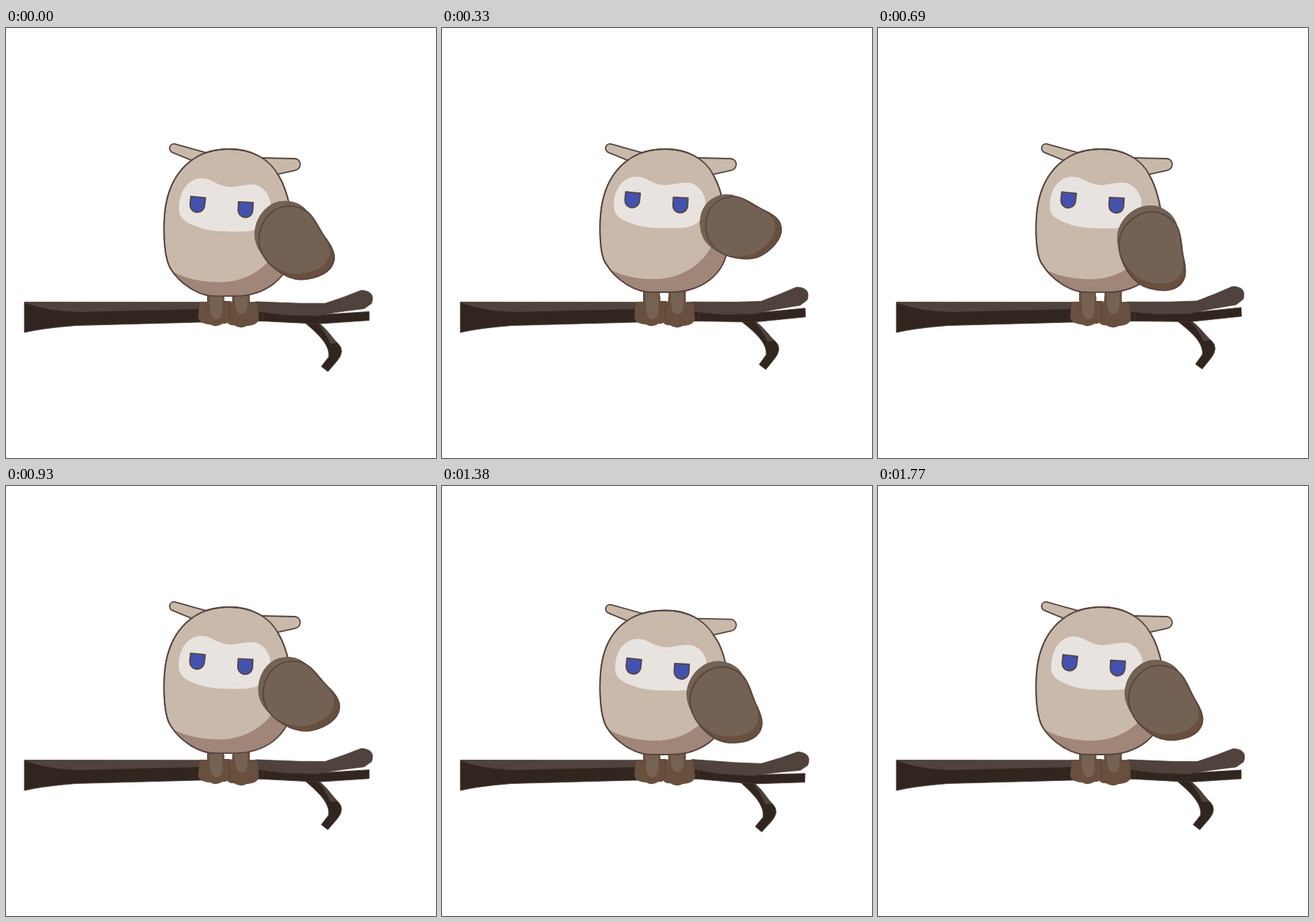
Animation of 586x586 px, one loop 1.8 s. Source, as an HTML page:

```html
<!DOCTYPE html>
<html lang="en">
<head>
<meta charset="utf-8">
<title>Owl on a branch</title>
<style>
  html, body { margin: 0; width: 100%; height: 100%; overflow: hidden; background: #fff; }
  svg { display: block; width: 100vw; height: 100vh; }
  .line { stroke: #574540; stroke-width: 1.8; stroke-linejoin: round; }
  .bark { stroke: #4a3a34; stroke-width: 0.8; stroke-linejoin: round; }
  .ear { stroke-linejoin: round; }
</style>
</head>
<body>
<svg viewBox="0 0 586 586">
  <defs>
    <path id="egg"/>
    <path id="leftEar" class="ear" d="M229 164L272 176L256 175Z"/>
    <path id="rightEar" class="ear" d="M393 186L349 185L366 192Z"/>
    <path id="feather" d="M343.500 290C344 262 365 243 385 243C420 244 421 270 437 291C447 306 450 318 440 330C428 343 405 344 400 344C378 343 345 320 343.500 290Z"/>
    <path id="leg" d="M-11 352H12V372H20V398Q17 404 10 403Q2 409 -7 404Q-22 403 -23 394L-21 373H-11Z"/>
    <path id="shin" d="M-8 352H10V387Q9 397 1 397Q-6 396 -7 382Z"/>
    <path id="eye" d="M-10-10H10V1C9 14-9 14-10 1Z"/>
    <clipPath id="eggClip"><use href="#egg"/></clipPath>
    <clipPath id="featherClip"><use href="#feather"/></clipPath>
  </defs>

  <g id="bough">
    <path class="bark" fill="#31261f" d="M408 402L425 401C438 410 445 423 453 430Q463 440 451 454L439 468L430 461L440 448C442 432 426 417 408 402Z"/>
    <path fill="#4f423d" d="M424 402C438 410 445 423 452 429L442 430Q436 414 424 402Z"/>
    <path class="bark" fill="#31261f" d="M340 382L435 390L495 386V398L425 403L340 399Z"/>
    <path class="bark" fill="#50423c" d="M340 373L400 375H435L461 366L484 357Q504 358 498 375L488 382Q440 388 425 392L380 391L340 386Z"/>
  </g>
  <path class="bark" fill="#31261f" d="M25 373.500L350 374V399L262 401L95 405.500Q50 409 25 415Z"/>
  <path fill="#50423c" d="M25 374L350 373.500V387L262 383L100 387Q55 386 25 374Z"/>

  <g fill="#69503e">
    <use href="#leg" x="285"/>
    <use href="#leg" transform="translate(321 2) scale(-1.030 1)"/>
    <path fill="none" stroke="#59402f" d="M297 366V373H309V366M304.500 374V399"/>
  </g>
  <g fill="#766253">
    <use href="#shin" x="285"/>
    <use href="#shin" x="319" y="-7"/>
  </g>

  <g id="ears" stroke="#574540">
    <use href="#leftEar" stroke-width="13.800"/>
    <use href="#rightEar" stroke-width="17.800"/>
  </g>
  <use href="#egg" class="line" fill="#c9b9aa"/>
  <g id="earFill" fill="#c9b9aa" stroke="#c9b9aa">
    <use href="#leftEar" stroke-width="10.200"/>
    <use href="#rightEar" stroke-width="14.200"/>
  </g>
  <g clip-path="url(#eggClip)">
    <path id="shade" fill="#a08679" d="M210 318Q235 346 290 347C337 347 367 318 377 284Q386 256 384 226H405V380H210Z"/>
  </g>
  <use href="#egg" id="rim" class="line" fill="none" clip-path="inset(0)"/>
  <path id="face" fill="#e8e3df" d="M236 245C237 215 255 205 266 205C282 205 288 217 308 217C330 214 338 211 347 217C358 224 361 236 361 243C360 270 345 278 320 278C300 278 285 278 268 274C248 267 235 262 236 245Z"/>
  <g id="eyes" class="line" fill="#4352ae">
    <use href="#eye" transform="translate(261 241) rotate(6)"/>
    <use href="#eye" transform="translate(326.500 248) rotate(3)"/>
  </g>

  <g id="wing">
    <use href="#feather" fill="#69503e"/>
    <use href="#feather" x="-6" y="-7.500" fill="#736253" clip-path="url(#featherClip)" id="sheen"/>
    <use href="#feather" class="line" fill="none"/>
  </g>
</svg>
<script>
const LOOP = 1800, STEP = 30;
const wingAngles = [[285, -32], [680, 22], [1155, -39], [1480, 22], [1560, 22]];
const boughDrops = [[600, -5.5], [1230, 6]];

const $ = id => document.getElementById(id);
const move = (id, transform) => $(id).setAttribute('transform', transform);

// Cosine easing through looping [time, value] keys.
function eased(keys, t) {
  const first = keys[0], last = keys[keys.length - 1];
  const ring = [[last[0] - LOOP, last[1]], ...keys, [first[0] + LOOP, first[1]]];
  const i = ring.findIndex(key => key[0] > t);
  const [t0, a] = ring[i - 1], [t1, b] = ring[i];
  return a + (b - a) * (1 - Math.cos(Math.PI * (t - t0) / (t1 - t0))) / 2;
}

function eggPath(top, bottom, side) {
  return `M304 ${top}C335 ${top} 358 ${top + 13} ${371 + side / 2} ${top + 35}
    C${386 + side} 224 ${392 + side} 262 ${391 + side / 2} 295
    C${388 + side / 2} ${bottom - 21} 350 ${bottom} 310 ${bottom}H285
    C262 ${bottom} 236 ${bottom - 18} 224 ${bottom - 38}
    C214 310 213 262 219 235C227 200 252 ${top} 304 ${top}Z`;
}

function draw(t) {
  // Rising lifts the lower body; sinking presses down the head.
  const bob = -1.7 + 6.2 * Math.cos(2 * Math.PI * (t - 1400) / LOOP);
  const lift = Math.min(bob, 0), press = Math.max(bob, 0);

  $('egg').setAttribute('d', eggPath(165 + press, 366 + lift * 0.88, lift * 0.4));
  move('ears', `translate(0 ${press * 0.8})`);
  move('earFill', `translate(0 ${press * 0.8})`);
  move('shade', `translate(${lift * 0.3} ${lift * 0.7})`);

  const faceTop = 205 + lift * 0.37 + press * 0.7;
  const faceBottom = 278 + lift * 0.75 + press * 0.2;
  move('face', `translate(${lift * 0.28} ${faceTop}) scale(1 ${(faceBottom - faceTop) / 73}) translate(0 -205)`);
  move('eyes', `translate(${lift * 0.25} ${bob})`);

  const angle = eased(wingAngles, t);
  const size = 1 + Math.min(angle, 0) * 0.0023;
  move('wing', `rotate(${angle} 360 253) translate(365 290) scale(${size}) translate(-365 -290)`);

  const sway = eased(boughDrops, t) / 140 * 180 / Math.PI;
  move('bough', `rotate(${sway} 350 385)`);
}

const start = performance.now();
function tick() {
  const t = (performance.now() - start) % LOOP;
  draw(Math.floor(t / STEP) * STEP);
  requestAnimationFrame(tick);
}
tick();
</script>
</body>
</html>
```
